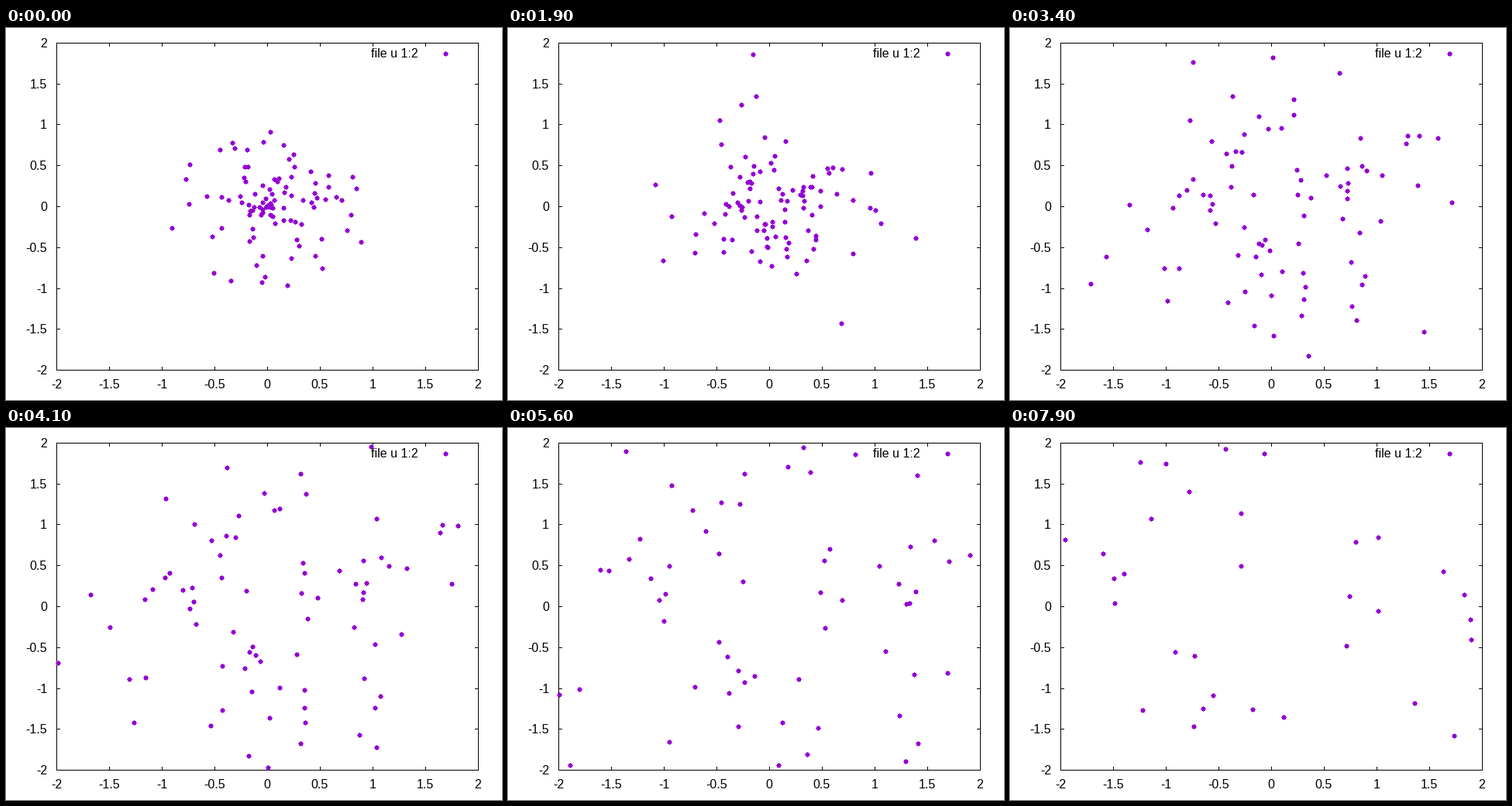
Write a matplotlib script that moves like this. It is 640 by 480 pixels and loops after 8 s.

```python
import numpy as np
import matplotlib.pyplot as plt
from matplotlib.animation import FuncAnimation
from matplotlib.collections import PolyCollection

FRAMES, STEP = 80, 100
PX = 0.72  # points per pixel at 100 dpi
LEFT, RIGHT, TOP, BOTTOM = 65, 609, 19, 441
COUNT = 98
BOUNCE = 0.6  # seconds until the collapsing cloud flies apart

plt.rcParams["font.family"] = "Liberation Sans"
rng = np.random.default_rng(11)


def unit(angle):
    return np.column_stack([np.cos(angle), np.sin(angle)])


# Cloud at rest: a disc that is densest in the middle
rank = (np.arange(COUNT) + 0.5) / COUNT
radius = rank ** 1.2
start = radius[:, None] * unit(rng.uniform(0, 2 * np.pi, COUNT))
fall_time = 0.5 + 0.8 * radius[:, None]

# Flight: log-normal speeds, random headings, a slight clockwise swirl
spread = np.quantile(rng.normal(size=10000), rank)
speed = rng.permutation(0.38 * np.exp(0.6 * spread))
heading = rng.uniform(0, 2 * np.pi, COUNT)
swirl = rng.normal(-0.06, 0.04, COUNT)


def cloud(t):
    """Infall to the centre, then flight outwards."""
    fall = start * np.maximum(0, 1 - (t / fall_time) ** 2)
    u = max(0, t - BOUNCE)
    return fall + (speed * u)[:, None] * unit(heading + swirl * u)


def x_px(x):
    return np.round(337 + 136 * x) + 0.5


def y_px(y):
    return np.round(230 - 105.5 * y) + 0.5


def dot_shape():
    """Round 5 px dot with a 1 px spike on each side."""
    side = np.array([(-.5, 3.5), (.5, 3.5), (.5, 2.5),
                     (2, 2.5), (2.5, 2), (2.5, .5)])
    sides = []
    for _ in range(4):
        sides.append(side)
        side = np.column_stack([side[:, 1], -side[:, 0]])
    return np.vstack(sides)


fig = plt.figure(figsize=(6.4, 4.8), dpi=100, facecolor="white")
ax = fig.add_axes([0, 0, 1, 1])
ax.set(xlim=(0, 640), ylim=(480, 0))
ax.axis("off")


def line(xs, ys):
    ax.plot(xs, ys, color="black", lw=PX, snap=False,
            solid_capstyle="projecting", solid_joinstyle="miter")


def label(x, y, s, ha):
    ax.text(x, y, s, size=16 * PX, ha=ha, va="baseline", color="black")


l, r, t, b = np.array([LEFT, RIGHT, TOP, BOTTOM]) + 0.5
line([l, r, r, l, l], [t, t, b, b, t])
for v in np.arange(-2, 2.5, 0.5):
    x, y = x_px(v), y_px(v)
    line([x, x], [b, b - 4])
    line([x, x], [t, t + 4])
    line([l, l + 4], [y, y])
    line([r, r - 4], [y, y])
    label(x - 0.5, 465, f"{v:g}", "center")
    label(53, y + 5.5, f"{v:g}", "right")
label(531.5, 38.5, "file u 1:2", "right")

DOT = dot_shape()
KEY = [[567.5, 33.5]]
dots = PolyCollection([], facecolor="#9400d3", edgecolor="none",
                      snap=False, clip_on=False, zorder=5)
ax.add_collection(dots, autolim=False)


def draw(i):
    p = cloud(i * STEP / 1000)
    p = p[np.abs(p).max(axis=1) <= 2]
    spots = np.vstack([KEY, np.column_stack([x_px(p[:, 0]), y_px(p[:, 1])])])
    dots.set_verts(spots[:, None] + DOT)
    return dots,


anim = FuncAnimation(fig, draw, frames=FRAMES, interval=STEP,
                     repeat=True, repeat_delay=0)
plt.show()
```
